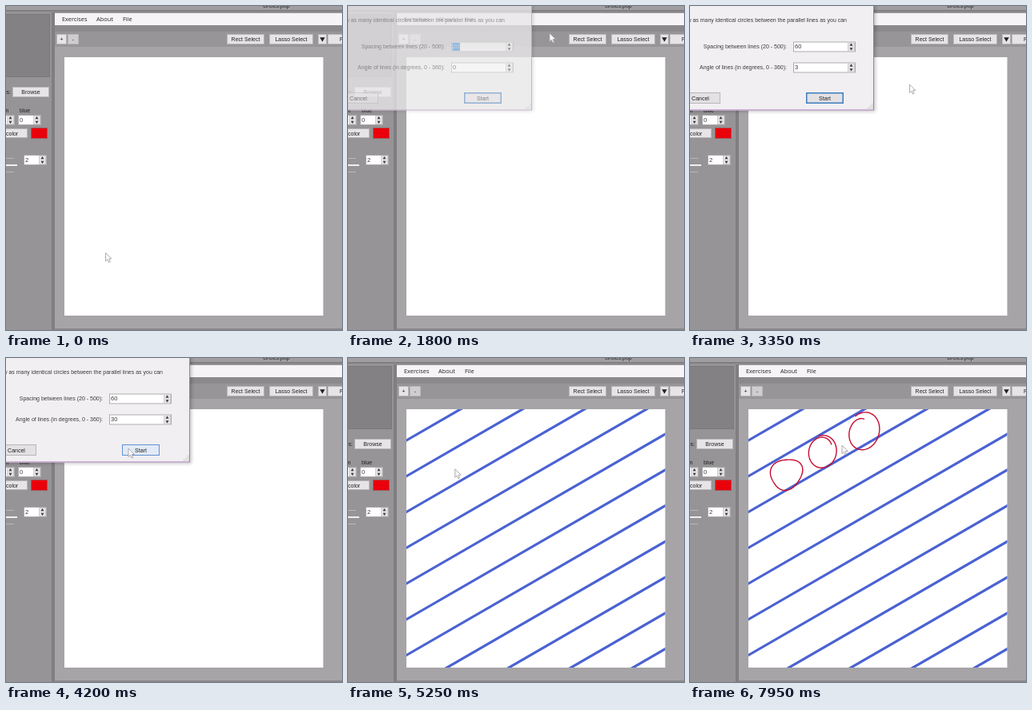
Write an HTML page with a canvas that moves like this. It is 420 by 405 pixels and loops after 8000 ms.

```html
<!DOCTYPE html>
<html lang="en">
<head>
<meta charset="utf-8">
<title>Circle practice</title>
<style>
  html, body { margin: 0; width: 100%; height: 100%; overflow: hidden; background: #969496; }
  canvas { display: block; width: 420px; height: 405px; }
</style>
</head>
<body>
<canvas id="stage" width="420" height="405"></canvas>
<script>
const ctx = document.getElementById('stage').getContext('2d');
const LOOP = 8000, STEP = 50;
const MENU_FONT = '7.4px "Open Sans", "Noto Sans", sans-serif';
const UI_FONT = '7px "Liberation Sans", Arial, sans-serif';
const INK = '#222022', SOFT_INK = '#3c3a3c';
const PAPER = { x: 73, y: 64, w: 323.5, h: 323 };
const SLOPE = Math.tan(Math.PI / 6);

// Hand-drawn loops: tilted ellipses that start slightly inside themselves
const LOOPS = [
  { from: 5450, to: 5950, cx: 120.5, cy: 145, rx: 20.5, ry: 18.5, tilt: -0.6, start: 4.2, turns: 1.03, inset: 0, wobble: 0.07 },
  { from: 6320, to: 6850, cx: 165.5, cy: 117, rx: 17.5, ry: 20.5, tilt: 0.2, start: -0.8, turns: 1.2, inset: 0.24, wobble: 0 },
  { from: 7150, to: 7850, cx: 217, cy: 91.5, rx: 19.5, ry: 24, tilt: 0.3, start: -1.9, turns: 1.09, inset: 0.35, wobble: 0 }
];

function loopPoint(loop, u) {
  const angle = loop.start - u * loop.turns * 2 * Math.PI;
  const size = (1 - loop.inset * (1 - u) ** 5) * (1 + loop.wobble * Math.cos(3 * (angle + loop.tilt) + 1.6));
  const x = Math.cos(angle) * loop.rx * size, y = Math.sin(angle) * loop.ry * size;
  const c = Math.cos(loop.tilt), s = Math.sin(loop.tilt);
  return { x: loop.cx + x * c - y * s, y: loop.cy + x * s + y * c };
}

// Places where the cursor rests; the drawn loops add their own ends
const stop = (at, x, y, until = at) => [{ at, x, y }, { at: until, x, y }];
const PATH = [
  stop(0, 124.5, 308.5), stop(800, 86, 17, 950), stop(1350, 168, 27.5), stop(1800, 252, 34),
  stop(2150, 274.5, 98, 3450), stop(4050, 153, 113, 4400), stop(5200, 137.5, 139), stop(7950, 190, 109),
  LOOPS.map(loop => ({ at: loop.from, ...loopPoint(loop, 0) })),
  LOOPS.map(loop => ({ at: loop.to, ...loopPoint(loop, 1) }))
].flat().sort((a, b) => a.at - b.at);

const ramp = (t, a, b) => Math.min(1, Math.max(0, (t - a) / (b - a)));
const between = (t, a, b) => t >= a && t < b;

function box(x, y, w, h, fill, edge, weight = 1) {
  ctx.fillStyle = fill;
  ctx.fillRect(x, y, w, h);
  if (!edge) return;
  ctx.strokeStyle = edge;
  ctx.lineWidth = weight;
  ctx.strokeRect(x + weight / 2, y + weight / 2, w - weight, h - weight);
}

function label(text, x, y, { font = UI_FONT, align = 'left', color = INK } = {}) {
  ctx.font = font;
  ctx.textAlign = align;
  ctx.fillStyle = color;
  ctx.fillText(text, x, y + 2.5);
}

function polygon(points, fill, edge) {
  ctx.beginPath();
  points.forEach(([x, y]) => ctx.lineTo(x, y));
  ctx.closePath();
  ctx.fillStyle = fill;
  ctx.fill();
  if (!edge) return;
  ctx.strokeStyle = edge;
  ctx.lineWidth = 0.9;
  ctx.stroke();
}

function triangle(x, y, size, angle, color) {
  const corner = k => [x + size * Math.cos(angle + k * 2.1), y + size * Math.sin(angle + k * 2.1)];
  polygon([0, 1, 2].map(corner), color);
}

function button(text, x, y, w, h = 13, fill = '#e6e4e6', edge = '#b8b6b8', weight = 1) {
  box(x, y, w, h, fill, edge, weight);
  label(text, x + w / 2, y + h / 2, { align: 'center' });
}

function spinner(value, x, y, w, selected) {
  const arrowX = x + w - 5.5;
  box(x, y, w, 13, '#fff', '#acaaac');
  box(x + w - 10, y + 1, 9, 11, '#e6e4e6', '#d0ced0');
  triangle(arrowX, y + 4.2, 2.3, -Math.PI / 2, SOFT_INK);
  triangle(arrowX, y + 8.8, 2.3, Math.PI / 2, SOFT_INK);
  if (selected) box(x + 1.5, y + 1.5, value.length * 4.2 + 1, 10, '#3f86cf');
  label(value, x + 2, y + 6, { color: selected ? '#fff' : SOFT_INK, font: UI_FONT.replace('7px', '7.5px') });
}

function panel(x, y, w, h, fill, edge, shade) {
  ctx.save();
  ctx.shadowColor = `rgba(0,0,0,${shade})`;
  ctx.shadowBlur = 4;
  ctx.shadowOffsetX = ctx.shadowOffsetY = 1.5;
  box(x, y, w, h, fill);
  ctx.restore();
  box(x, y, w, h, fill, edge);
}

function drawSidebar() {
  box(-2, 10, 57, 79, '#838183', '#7a787a');
  box(57, 8, 4, 397, '#807e80');
  label('es:', 6, 107, { align: 'right' });
  button('Browse', 8, 101, 46);
  label('n', 3.5, 130, { align: 'right' });
  label('blue', 17, 130);
  spinner('', -20, 136, 31);
  spinner('0', 15, 136, 29);
  box(-20, 153, 47, 12, '#e6e4e6', '#b8b6b8');
  label('color', 0, 159);
  box(31, 152, 21, 14, '#ea000a', '#a0585c');
  box(0, 190, 10, 1, '#b8b6b8');
  box(0, 198, 14, 2, '#f0eef0');
  box(0, 207, 10, 1, '#b8b6b8');
  spinner('2', 22, 186, 29);
}

function drawWindow() {
  box(0, 0, 420, 405, '#969496');
  box(0, 0, 420, 5, '#a09ea0');
  box(0, 5, 420, 2, '#807e80');
  label('circles.pop', 338, -1, { align: 'center' });
  drawSidebar();
  box(61, 9, 359, 15, '#f6f4f6');
  box(61, 24, 359, 8, '#8b898b');
  box(61, 32, 359, 19, '#979597');
  box(61, 51, 359, 352, '#a6a4a6');
  box(61, 403, 359, 2, '#8b898b');
  button('+', 63, 35, 13);
  button('-', 77, 35, 14, 13, '#cfcdcf');
  button('Rect Select', 276, 35, 47);
  button('Lasso Select', 329, 35, 55);
  button('', 390, 35, 11);
  triangle(395.5, 41, 3.7, Math.PI / 2, INK);
  button('', 402, 35, 40);
  label('F', 417, 41.5);
  box(PAPER.x, PAPER.y, PAPER.w, PAPER.h, '#fff');
}

function drawMenus(t) {
  const font = { font: MENU_FONT };
  const highlight = (x, y, w) => box(x, y, w, 13.5, '#b4cef3', '#6d9bd6');
  if (between(t, 750, 900)) highlight(64, 10, 43);
  if (between(t, 900, 1800)) box(64, 10, 43, 14, '#f6f4f6', '#9b999b');
  label('Exercises', 70, 16, font);
  label('About', 113, 16, font);
  label('File', 146, 16, font);
  if (!between(t, 900, 1800)) return;

  panel(64, 22, 104, 30, '#f5f3f5', '#a3a1a3', 0.3);
  if (t >= 1050) highlight(65, 24, 102);
  label('Muscle Memory', 87, 30.5, font);
  label('Red Lining', 87, 44.5, font);
  triangle(159, 30.5, 2.4, 0, INK);
  if (t < 1250) return;
  panel(168, 23, 133, 17, '#f5f3f5', '#a3a1a3', 0.3);
  if (t >= 1500) highlight(170, 25, 129);
  label('Repeated Circles Practice', 191, 31.5, font);
}

function drawGuides() {
  ctx.save();
  ctx.beginPath();
  ctx.rect(PAPER.x, PAPER.y, PAPER.w, PAPER.h);
  ctx.clip();
  ctx.strokeStyle = '#4a62d2';
  ctx.lineWidth = 3.2;
  ctx.beginPath();
  for (let y = 103; y < 620; y += 44.75) {
    ctx.moveTo(63, y + 10 * SLOPE);
    ctx.lineTo(407, y - 334 * SLOPE);
  }
  ctx.stroke();
  ctx.restore();
}

function drawLoops(t) {
  ctx.save();
  ctx.strokeStyle = '#c50a30';
  ctx.lineWidth = 1.4;
  ctx.lineCap = ctx.lineJoin = 'round';
  for (const loop of LOOPS) {
    const end = ramp(t, loop.from, loop.to);
    if (!end) continue;
    ctx.beginPath();
    for (let k = 0; k <= 80; k++) {
      const { x, y } = loopPoint(loop, end * k / 80);
      ctx.lineTo(x, y);
    }
    ctx.stroke();
  }
  ctx.restore();
}

const typed = (t, old, text, start) =>
  t < start ? old : text.slice(0, 1 + Math.floor((t - start) / 150));

function drawDialog(t) {
  const alpha = ramp(t, 1750, 1850) * (1 - ramp(t, 4250, 4400));
  if (!alpha) return;
  const hover = t >= 3950;
  const right = { align: 'right', color: SOFT_INK };
  ctx.globalAlpha = alpha;
  panel(-10, -10, 240, 140.5, '#f1eff2', '#a678b4', 0.22);
  label('Draw as many identical circles between the parallel lines as you can', 196, 17, right);
  label('Spacing between lines (20 - 500):', 121, 50.5, right);
  label('Angle of lines (in degrees, 0 - 360):', 121, 76.5, right);
  spinner(typed(t, '20', '60', 2750), 129, 44.5, 78, t < 2750);
  spinner(typed(t, '0', '30', 3250), 129, 70.5, 78, between(t, 3050, 3250));
  button('Cancel', -12, 108, 50, 14, '#e3e1e3', '#b8b6b8');
  button('Start', 145, 108, 47, 14, hover ? '#e2eaf7' : '#e3e1e3', hover ? '#5f93cf' : '#3c7cc0', hover ? 1 : 1.5);
  for (let r = 0; r < 3; r++)
    for (let c = 0; c <= r; c++) box(227 - 2.5 * c, 122 + 2.5 * r, 1.3, 1.3, '#bcbabc');
  ctx.globalAlpha = 1;
}

function cursorAt(t) {
  const loop = LOOPS.find(({ from, to }) => between(t, from, to));
  if (loop) return loopPoint(loop, ramp(t, loop.from, loop.to));
  const next = PATH.findIndex(({ at }) => at > t);
  if (next < 0) return PATH[PATH.length - 1];
  const a = PATH[next - 1], b = PATH[next];
  const u = ramp(t, a.at, b.at), ease = u * u * (3 - 2 * u);
  return { x: a.x + (b.x - a.x) * ease, y: a.y + (b.y - a.y) * ease };
}

function drawCursor(t) {
  const { x, y } = cursorAt(t);
  const arrow = [[0, 0], [0, 10.5], [2.4, 8.3], [4, 12], [5.7, 11.2], [4.2, 7.6], [7.4, 7.4]];
  polygon(arrow.map(([dx, dy]) => [x + dx, y + dy]), '#fcfafc', '#a5a3a7');
}

function draw(t) {
  drawWindow();
  if (t >= 4300) drawGuides();
  drawLoops(t);
  drawMenus(t);
  drawDialog(t);
  drawCursor(t);
}

const start = performance.now();
function tick() {
  const t = (performance.now() - start) % LOOP;
  draw(Math.floor(t / STEP) * STEP);
  requestAnimationFrame(tick);
}
tick();
</script>
</body>
</html>
```
